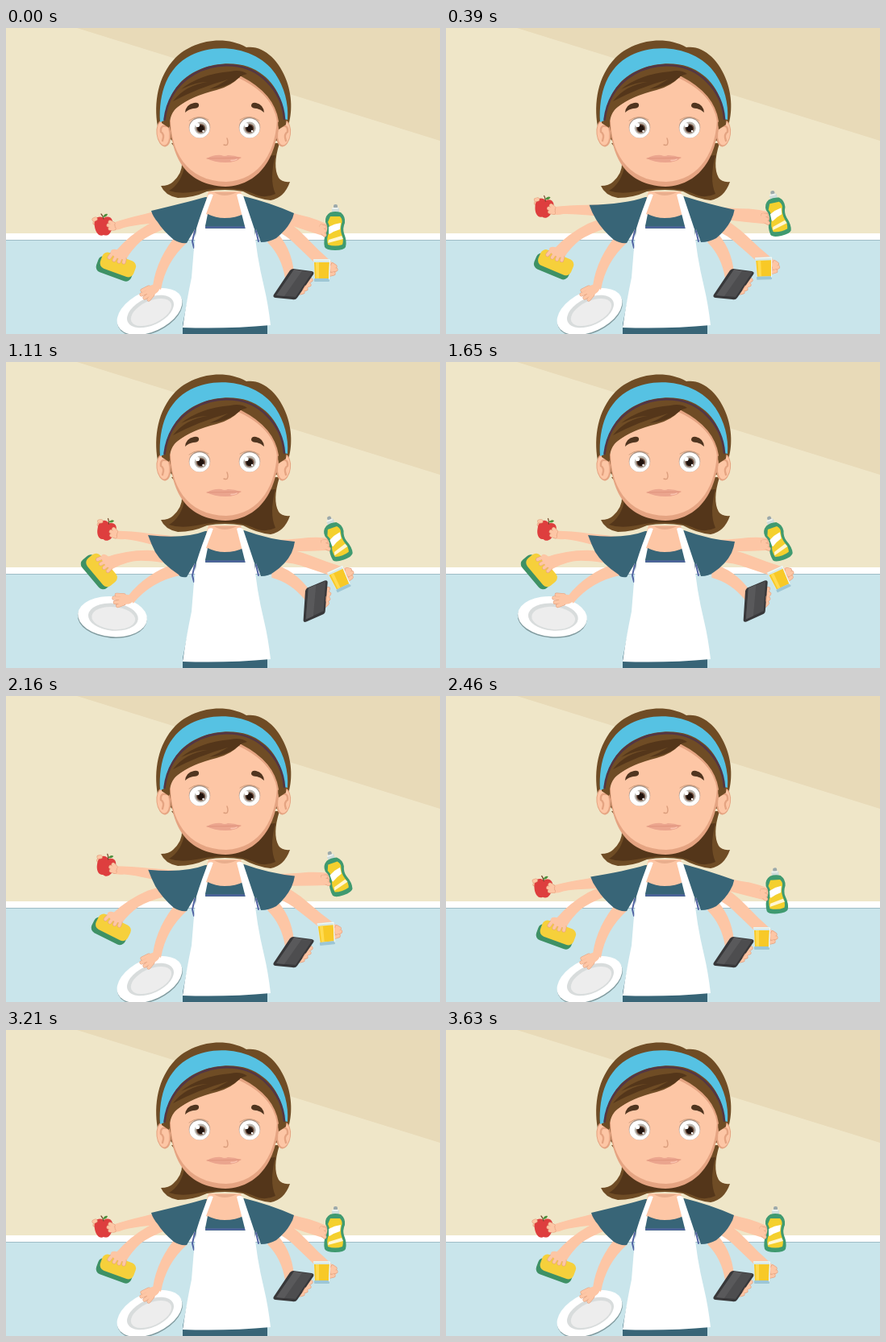
An HTML page with a canvas that plays this animation: 538 by 380 pixels, repeating every 3.66 s.

```html
<!DOCTYPE html>
<html lang="en">
<head>
<meta charset="utf-8">
<title>Six busy arms</title>
<style>
html, body { margin: 0; width: 100%; height: 100%; overflow: hidden; background: #efe6c8; }
canvas { display: block; width: 538px; height: 380px; }
</style>
</head>
<body>
<canvas id="stage" width="538" height="380"></canvas>
<script>
const ctx = document.getElementById('stage').getContext('2d');
const LOOP = 3660;
const SKIN = '#fdc6a5', SHADE = '#e5a482', TEAL = '#386577', HAIR = '#6f4c25', DARK = '#54361a';

const paths = new Map();
function path(d) {
  if (!paths.has(d)) paths.set(d, new Path2D(d));
  return paths.get(d);
}
function fill(color, d) {
  ctx.fillStyle = color;
  ctx.fill(path(d));
}
function line(color, width, d) {
  ctx.strokeStyle = color;
  ctx.lineWidth = width;
  ctx.stroke(path(d));
}
function oval(color, x, y, rx, ry = rx, turn = 0) {
  ctx.fillStyle = color;
  ctx.beginPath();
  ctx.ellipse(x, y, rx, ry, turn, 0, 7);
  ctx.fill();
}
function box(color, x, y, w, h, r = 0) {
  ctx.fillStyle = color;
  ctx.beginPath();
  ctx.roundRect(x, y, w, h, r);
  ctx.fill();
}
function around(x, y, degrees, draw) {
  ctx.save();
  ctx.translate(x, y);
  ctx.rotate(degrees * Math.PI / 180);
  ctx.translate(-x, -y);
  draw();
  ctx.restore();
}
function fingers(d) {
  line(SHADE, 5, d);
  line(SKIN, 3.8, d);
}
const mix = (a, b, k) => a + (b - a) * k;
function ease(t, start, end) {
  const p = Math.min(1, Math.max(0, (t - start) / (end - start)));
  return (1 - Math.cos(Math.PI * p)) / 2;
}

function room() {
  box('#efe6c8', 0, 0, 538, 256);
  fill('#e8dab8', 'M88 0L538 140V0Z');
  box('#fff', 0, 255, 538, 8);
  box('#c9e5eb', 0, 263, 538, 117);
  box('#9fbcc6', 0, 263, 538, 1);
}

function appleArm() {
  fill(SKIN, 'M215 221Q190 226 172 231Q150 236 132 242L131 251Q138 252 146 248Q158 245 177 243L216 239Z');
  fingers('M114 238L110 238M114 243L110 242');
  fill('#de3e3e', 'M121 236C130 231 134 239 132 247C130 256 126 259 121 257C116 260 111 254 110 247C108 237 114 232 121 236Z');
  line('#70462a', 1.2, 'M121 237Q120 233 118 231');
  fill('#4d8f3c', 'M120 235Q122 230 126 231Q125 235 120 235Z');
  oval(SKIN, 134, 246, 4, 4.5);
  fingers('M133 243L129 241M133 246L127 245M134 249L129 249');
  fingers('M111 237L109 238');
}

function spongeArm() {
  around(137, 296, 20, () => {
    box('#3e9165', 113, 289, 46, 21, 7);
    box('#f6d03b', 116, 283, 44, 21, 7);
  });
  fill(SKIN, 'M205 233Q188 238 176 244Q153 257 136 277L149 287Q156 275 167 265Q177 257 200 248Z');
  fingers('M131 281L128 285M137 283L134 288M142 285L140 290M147 287L146 291');
  oval(SKIN, 139.5, 281, 10.5, 5, .4);
}

function plateArm() {
  const tilt = -25 * Math.PI / 180;
  oval('#819b9f', 178.5, 353.5, 43, 25, tilt);
  oval('#fff', 178, 352, 43, 25, tilt);
  oval('#d8dcdc', 179, 352, 31, 17, tilt);
  oval('#ededed', 180, 353, 27, 14, tilt);
  fill(SKIN, 'M213 255Q187 285 182 320L192 325Q198 290 225 266Z');
  fingers('M177 322L169 326M178 326L168 331M180 329L172 335M182 331L177 337');
  oval(SKIN, 182, 325, 9, 6, -.5);
}

function bottleArm() {
  fill(SKIN, 'M325 220Q354 230 376 235Q389 239 399 244L396 259Q373 252 350 244L321 240Z');
  oval(SKIN, 397, 251, 6, 8);
  box('#cfdcda', 404, 223, 9, 7, 2);
  box('#9ca9ab', 406, 219, 5, 5, 2);
  box('#edf1ee', 404, 223, 8, 2, 1);
  fill('#3f9a70', 'M402 229Q408 227 415 229Q421 234 420 242Q417 249 419 255Q423 265 421 272Q419 276 408 276Q397 276 395 272Q393 263 397 254Q400 248 396 241Q395 233 402 229Z');
  fill('#f4d02e', 'M402 234H414Q418 238 416 243Q414 249 416 256Q419 263 417 269Q408 272 399 269Q397 261 400 255Q403 249 399 241Z');
  fill('#fff', 'M400 247Q407 243 415 242L414 250Q407 252 401 256L400 255Z');
  fill('#fff7d4', 'M400 263L416 258L418 262L399 267Z');
  fingers('M391 246L395 247M391 250L395 252M392 254L395 257');
  oval(SKIN, 391, 250, 3, 6);
}

function glassArm() {
  fill(SKIN, 'M334 231Q356 243 372 260Q386 275 403 290L392 301Q375 284 360 270Q350 259 332 250Z');
  oval(SKIN, 402, 299, 8.5, 8.5);
  fingers('M405 294L408 296M404 301L409 300M402 306L406 305');
  fill('#d6e8e7', 'M381 287H402L401 315H382Z');
  fill('#f8c927', 'M382 291H401L400 311H383Z');
  fill('#ffdb52', 'M384 291H388V311H384.5Z');
  box('#9cc6d6', 382, 311, 19, 4, 1);
  line('#f4fbf7', 1, 'M381.5 288H401.5L400.5 312');
  oval(SKIN, 405, 298, 3, 4);
}

function phoneArm() {
  fill(SKIN, 'M333 251Q354 272 357 304L346 311Q342 284 324 266Z');
  oval(SKIN, 362, 317, 12, 8, -.7);
  fingers('M378 313L374 316M376 319L371 321M372 324L368 325M368 328L364 329');
  fill('#38383a', 'M356 299L379 302Q383 303 381 306L361 335Q359 338 355 337L334 335Q330 334 332 331L352 301Q354 299 356 299Z');
  fill('#4d4d4f', 'M357 300L380 303L359 334L335 332Z');
  fill('#59595b', 'M357 300L367 301.5L345 333L335 332Z');
  line(SHADE, 1, 'M371 320L368 325');
}

function body(top, low) {
  const at = (a, b, k = top) => mix(a, b, k);
  ctx.fillStyle = TEAL;
  ctx.beginPath();
  ctx.moveTo(247, 210);
  ctx.quadraticCurveTo(222, at(217, 220), at(180, 176), at(227, 215));
  ctx.quadraticCurveTo(at(182, 180), at(234, 226), at(188, 185), at(241, 236));
  ctx.quadraticCurveTo(194, 251, at(208, 214, low), at(263, 264, low));
  ctx.quadraticCurveTo(216, 268, 224, 267);
  ctx.lineTo(234, 250);
  ctx.lineTo(237, 280);
  ctx.lineTo(219, 368);
  ctx.lineTo(219, 380);
  ctx.lineTo(324, 380);
  ctx.lineTo(324, 368);
  ctx.lineTo(306, 270);
  ctx.lineTo(310, 250);
  ctx.lineTo(316, 266);
  ctx.quadraticCurveTo(326, 266, at(335, 332, low), 261);
  ctx.quadraticCurveTo(347, 251, at(352, 354), at(242, 237));
  ctx.quadraticCurveTo(at(356, 357), at(236, 230), at(357, 358), at(230, 223));
  ctx.quadraticCurveTo(328, at(217, 221), 295, 209);
  ctx.fill();
  line('#5264a3', 2, 'M234 252L231 265L233 273M310 252L313 265');

  fill(SKIN, 'M251 203H291L297 223Q292 237 271 237Q249 237 246 222Z');
  fill('#fff', 'M251 207Q255 205 258 208Q253 228 247 249H308Q310 280 320 322Q325 343 328 369Q274 374 219 372Q224 338 230 310Q232 279 236 249Q243 226 251 207Z');
  fill(TEAL, 'M256 217L247 247H297L289 217Q294 233 271 236Q251 235 256 217Z');
  fill(SKIN, 'M258 204H286L296 233Q286 237 271 237Q257 236 248 231Z');
  fill('#e9ae8d', 'M258 204H286Q278 208 271 208Q264 208 258 204Z');
  fill(TEAL, 'M250 231Q260 236 271 236Q285 236 294 231L297 246H247Z');
  line('#5264a3', 2.2, 'M248 247.5H297');
  fill('#fff', 'M286 207Q290 204 294 208L308 250H297Z');
}

function ear(x, side) {
  oval(SHADE, x, 131, 9, 16.5, side * .12);
  oval(SKIN, x + side * .6, 131, 7.4, 14.5, side * .12);
  line(SHADE, 2.4, side < 0
    ? 'M199 122Q191 120 192 129Q197 132 194 140'
    : 'M342 122Q350 120 349 129Q344 132 347 140');
}

function eye(x, look) {
  oval('#a9968a', x, 123.6, 13.2, 13);
  oval('#fff', x, 124.4, 12.6, 12.2);
  oval('#b9b5ae', x + look, 124.2, 7.8);
  oval('#765747', x + look, 124.6, 5.7);
  oval('#20140f', x + look, 124.8, 4.3);
  oval('#fff', x + look - 4, 120.5, 2.6);
  oval('#fff', x + look + 3, 128, 1.2);
}

function head() {
  fill(HAIR, 'M188 122C183 93 188 60 210 37C229 18 267 7 298 24C319 21 339 40 348 66C356 89 354 110 349 124L336 140H206Z');
  // Flipped ends below the chin
  fill(HAIR, 'M205 143Q230 170 207 191Q202 196 192 196Q197 208 213 211Q232 211 249 203Q271 199 294 203Q310 212 328 214Q345 211 352 191Q342 192 338 186Q330 172 339 143Z');
  fill(DARK, 'M222 168Q218 193 202 202Q216 207 236 203Q255 199 271 199Q292 199 305 205Q320 213 334 206Q326 188 334 158Z');
  ear(195.5, -1);
  ear(344, 1);

  // Face and parted fringe
  fill(SHADE, 'M203 104C202 157 220 195 272 197C319 195 338 153 338 109C327 77 304 61 286 57Q242 78 203 104Z');
  fill(SKIN, 'M204 104C202 154 224 190 273 191C316 189 336 151 336 108Q325 79 288 62Q240 77 204 104Z');
  fill(HAIR, 'M193 118Q193 78 220 59Q248 39 280 44Q322 48 341 83Q350 101 347 120L338 126Q338 87 290 60Q280 72 261 77Q229 85 213 98Q203 105 202 124Z');
  fill(DARK, 'M207 91Q222 71 250 67Q236 67 217 76Q241 57 278 54Q291 51 299 57Q291 59 290 61Q275 74 252 76Q264 71 275 64Q239 74 207 91Z');
  line(SHADE, 2, 'M291 61Q332 82 337 116');
  fill('#56c2e3', 'M191 117C189 80 200 49 229 34C262 17 313 25 334 57Q351 83 349 114L345 113C343 81 327 58 300 48C272 39 235 47 215 69Q199 87 196 115Z');
  line('#533644', 2.6, 'M196.5 114C199 92 210 70 233 57C263 40 301 43 323 66Q343 85 345 113');

  eye(240, 1.5);
  eye(302, 0);
  line('#d3a07f', 1, 'M227 115Q239 106 251 114M290 114Q302 106 314 115');
  fill('#50351f', 'M222 105Q223 95 233 93Q240 92 239 97Q238 100 232 100Q226 101 222 105ZM320 105Q319 95 310 93Q304 92 304 97Q305 100 311 100Q316 101 320 105Z');
  line('#dc9e7d', 1.4, 'M274 137Q276 142 274 145Q273 146 270 145');
  fill('#eba58e', 'M249 162Q258 157 267 158Q271 160 275 158Q283 158 291 161Q286 167 272 167Q258 167 249 162Z');
  line('#dd9079', .8, 'M249 162Q270 162 291 161');
  line('#fbc5b1', 1.5, 'M279 164.5Q283 165 286 163');
}

function draw(t) {
  const top = ease(t, 90, 620) - ease(t, 2080, 2620);
  const mid = ease(t, 290, 800) - ease(t, 1800, 2320);
  const low = ease(t, 590, 1130) - ease(t, 1640, 2130);
  room();
  around(222, 248, 30 * low, plateArm);
  around(330, 257, -30 * low, phoneArm);
  around(195, 238.5, 30 * mid, spongeArm);
  around(332, 236, -25 * mid, glassArm);
  around(226, 237, 20 * top, appleArm);
  around(327, 230, -20 * top, bottleArm);
  body(top, low);
  head();
}

ctx.lineCap = ctx.lineJoin = 'round';
const began = performance.now();
function tick() {
  draw((performance.now() - began) % LOOP);
  requestAnimationFrame(tick);
}
tick();
</script>
</body>
</html>
```
